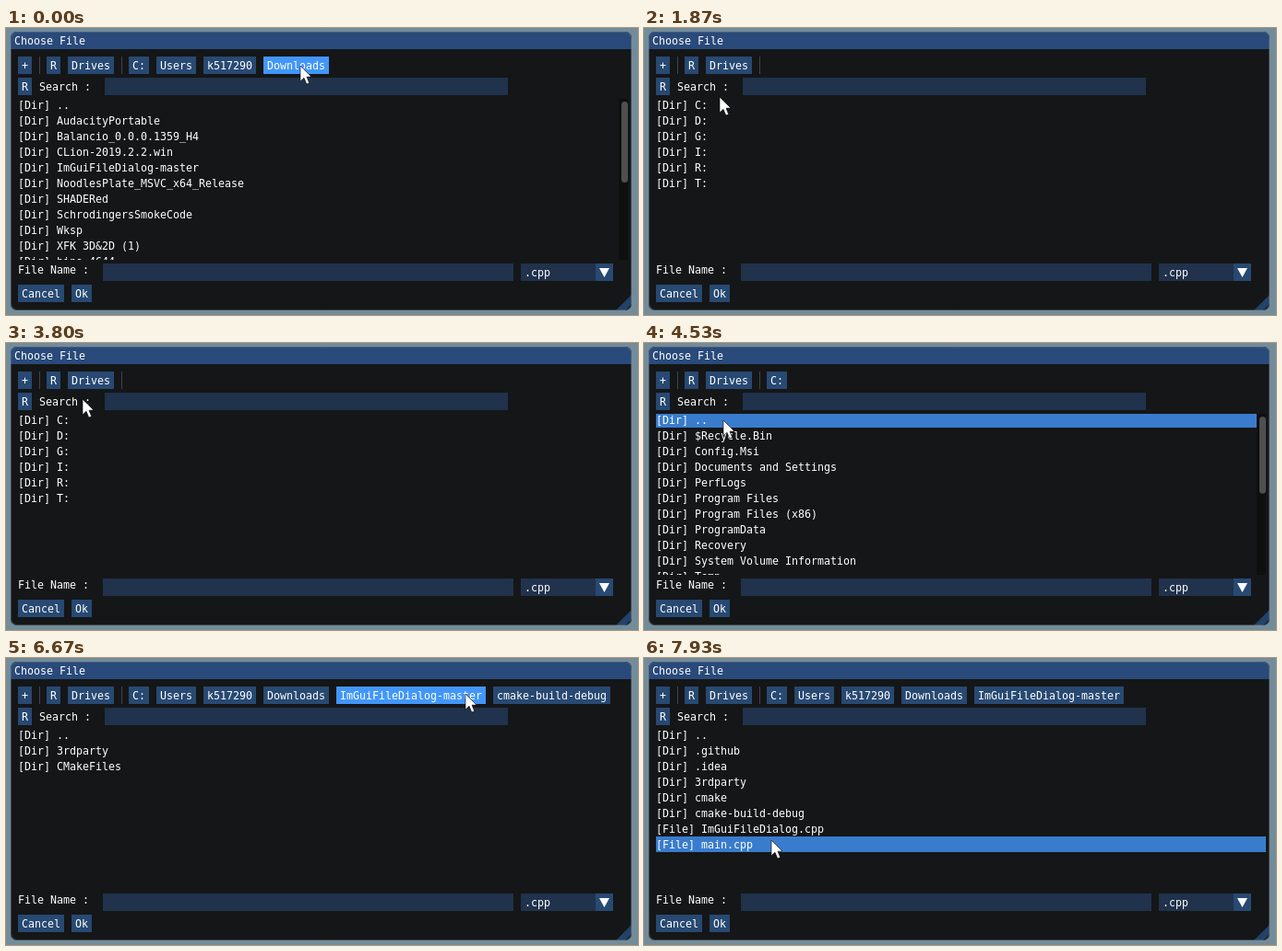
Write an HTML page with a canvas that moves like this. It is 685x312 px and loops after 8 s.

```html
<!DOCTYPE html>
<html lang="en">
<head>
<meta charset="utf-8">
<title>Choose File</title>
<style>
html, body { margin: 0; width: 100%; height: 100%; overflow: hidden; background: #738c99; }
canvas { display: block; }
</style>
</head>
<body>
<canvas id="stage" width="685" height="312"></canvas>
<script>
const ctx = document.getElementById('stage').getContext('2d');
const LOOP = 8000, FPS = 15, TICKS = 120;
const CHAR = 7, ROW = 17, FRAME = 19, GAP = 8;
const LIST = { x: 13, y: 77, w: 661, h: 175 };
const BUTTON = '#274972', HOVER = '#4296fa', ACTIVE = '#0f87fa';
const FIELD = '#20324c', ROW_HOVER = '#397ccd', LINE = '#41424b';

const home = ['C:', 'Users', 'k517290', 'Downloads'];
const project = [...home, 'ImGuiFileDialog-master'];
const dirs = text => text.split('|').map(name => '[Dir] ' + name);
const drives = { path: [], rows: dirs('C:|D:|G:|I:|R:|T:') };

// Each folder opens at tick `open`, after the mouse went down at tick `press`
const views = [
  { press: 0, open: 0, path: home, total: 20, rows: dirs('..|AudacityPortable|Balancio_0.0.0.1359_H4|CLion-2019.2.2.win|ImGuiFileDialog-master|NoodlesPlate_MSVC_x64_Release|SHADERed|SchrodingersSmokeCode|Wksp|XFK 3D&2D (1)|bino_4644') },
  { press: 22, open: 24, ...drives },
  { press: 38, open: 40, path: ['D:'], rows: dirs('..|LocalData|Public|System Volume Information') },
  { press: 53, open: 55, ...drives },
  { press: 65, open: 67, path: ['C:'], total: 21, rows: dirs('..|$Recycle.Bin|Config.Msi|Documents and Settings|PerfLogs|Program Files|Program Files (x86)|ProgramData|Recovery|System Volume Information|Temp') },
  { press: 75, open: 77, path: [...project, 'cmake-build-debug'], rows: dirs('..|3rdparty|CMakeFiles') },
  { press: 103, open: 106, path: project, rows: [...dirs('..|.github|.idea|3rdparty|cmake|cmake-build-debug'), '[File] ImGuiFileDialog.cpp', '[File] main.cpp'] }
];
const viewAt = k => views.findLast(v => k >= v.open) || views[0];

// Where the pointer goes: first tick, last tick, x, y, sag of the path
const moves = [
  [2, 5, 243, 45],
  [6, 8, 238, 44],
  [10, 17, 90, 42, 20],
  [22, 32.5, 76, 97],
  [41, 53, 80, 42],
  [54, 60.5, 86, 84],
  [68, 74, 50, 42],
  [80, 83.5, 273, 149],
  [88, 100, 498, 39],
  [106, 110, 300, 150],
  [111, 119, 138, 198]
];

function pointer(k) {
  let x = 319, y = 41;
  for (const [from, to, toX, toY, sag = 0] of moves) {
    const u = Math.min(1, Math.max(0, (k - from) / (to - from)));
    const ease = u * u * (3 - 2 * u);
    x += (toX - x) * ease;
    y += (toY - y) * ease + sag * Math.sin(Math.PI * u);
  }
  return { x: Math.round(x), y: Math.round(y) };
}

function box(x, y, w, h, color) {
  ctx.fillStyle = color;
  ctx.fillRect(x, y, w, h);
}

function label(text, x, y) {
  ctx.fillStyle = '#fff';
  ctx.fillText(text, x, y);
}

function shape(points, color) {
  ctx.beginPath();
  points.forEach(([x, y]) => ctx.lineTo(x, y));
  ctx.closePath();
  ctx.fillStyle = color;
  ctx.fill();
}

function pill(x, y, w, h, r, color) {
  ctx.beginPath();
  ctx.roundRect(x, y, w, h, r);
  ctx.fillStyle = color;
  ctx.fill();
}

function drawPanel() {
  box(0, 0, 685, 312, '#738c99');
  pill(5, 4, 673, 303, 7, '#151617');
  pill(5, 4, 673, FRAME, [7, 7, 0, 0], '#294a7a');
  shape([[678, 290], [678, 300], [671, 307], [661, 307]], '#23426a');
  ctx.beginPath();
  ctx.roundRect(5.5, 4.5, 672, 302, 7);
  ctx.strokeStyle = 'rgba(110,110,128,.5)';
  ctx.lineWidth = 1;
  ctx.stroke();
  label('Choose File', 9, 18);
}

function drawList(rows, scrollTotal, mouse, pressed) {
  const { x, y, w, h } = LIST;
  ctx.save();
  ctx.beginPath();
  ctx.rect(x, y, w, h);
  ctx.clip();
  rows.forEach((text, i) => {
    const top = y - 2 + i * ROW;
    if (mouse.y >= Math.max(y, top) && mouse.y < top + ROW)
      box(x, top, w, ROW, pressed ? HOVER : ROW_HOVER);
    label(text, x, top + 13);
  });
  if (scrollTotal) {
    box(664, y, 10, h, '#0e0f0f');
    pill(667, y + 3, 7, (h - 4) * h / (scrollTotal * ROW), 3.5, '#4f4f4f');
  }
  ctx.restore();
}

function drawPointer({ x, y }) {
  ctx.save();
  ctx.translate(x, y);
  shape([[0, 0], [0, 17], [4, 13.3], [6.8, 20], [9.7, 18.8], [7, 12.2], [12, 12]], '#fff');
  ctx.strokeStyle = '#000';
  ctx.lineWidth = 0.6;
  ctx.stroke();
  ctx.restore();
}

function draw(k) {
  const view = viewAt(k);
  const mouse = pointer(k - 0.5); // highlights trail the pointer a little
  const pressed = views.some(v => k >= v.press && k < v.open);

  // Returns the x where the next button begins
  function button(text, x, y) {
    const w = text.length * CHAR + 8;
    const over = mouse.x >= x && mouse.x < x + w && mouse.y >= y && mouse.y < y + FRAME;
    box(x, y, w, FRAME, over ? (pressed ? ACTIVE : HOVER) : BUTTON);
    label(text, x + 4, y + 14);
    return x + w + GAP;
  }
  function divider(x) {
    box(x, 31, 1, FRAME, LINE);
    return x + GAP;
  }

  drawPanel();
  let x = divider(button('+', 13, 31));
  for (const name of ['R', 'Drives']) x = button(name, x, 31);
  x = divider(x);
  for (const name of view.path) x = button(name, x, 31);

  button('R', 13, 54);
  label('Search :', 36, 68);
  box(107, 54, 437, FRAME, FIELD);

  drawList(view.rows, viewAt(k - 1).total, mouse, pressed); // scrollbar lags one tick

  label('File Name :', 13, 267);
  box(105, 256, 445, FRAME, FIELD);
  box(558, 256, 81, FRAME, FIELD);
  label('.cpp', 562, 270);
  box(639, 256, FRAME, FRAME, BUTTON);
  shape([[643, 261], [654, 261], [648.5, 271]], '#fff');
  button('Ok', button('Cancel', 13, 279), 279);

  drawPointer(pointer(k));
}

ctx.font = '11.63px "DejaVu Sans Mono", "Liberation Mono", monospace';
const start = performance.now();
function tick() {
  const t = (performance.now() - start) % LOOP;
  draw(Math.floor((t + 4) * FPS / 1000) % TICKS);
  requestAnimationFrame(tick);
}
tick();
</script>
</body>
</html>
```
